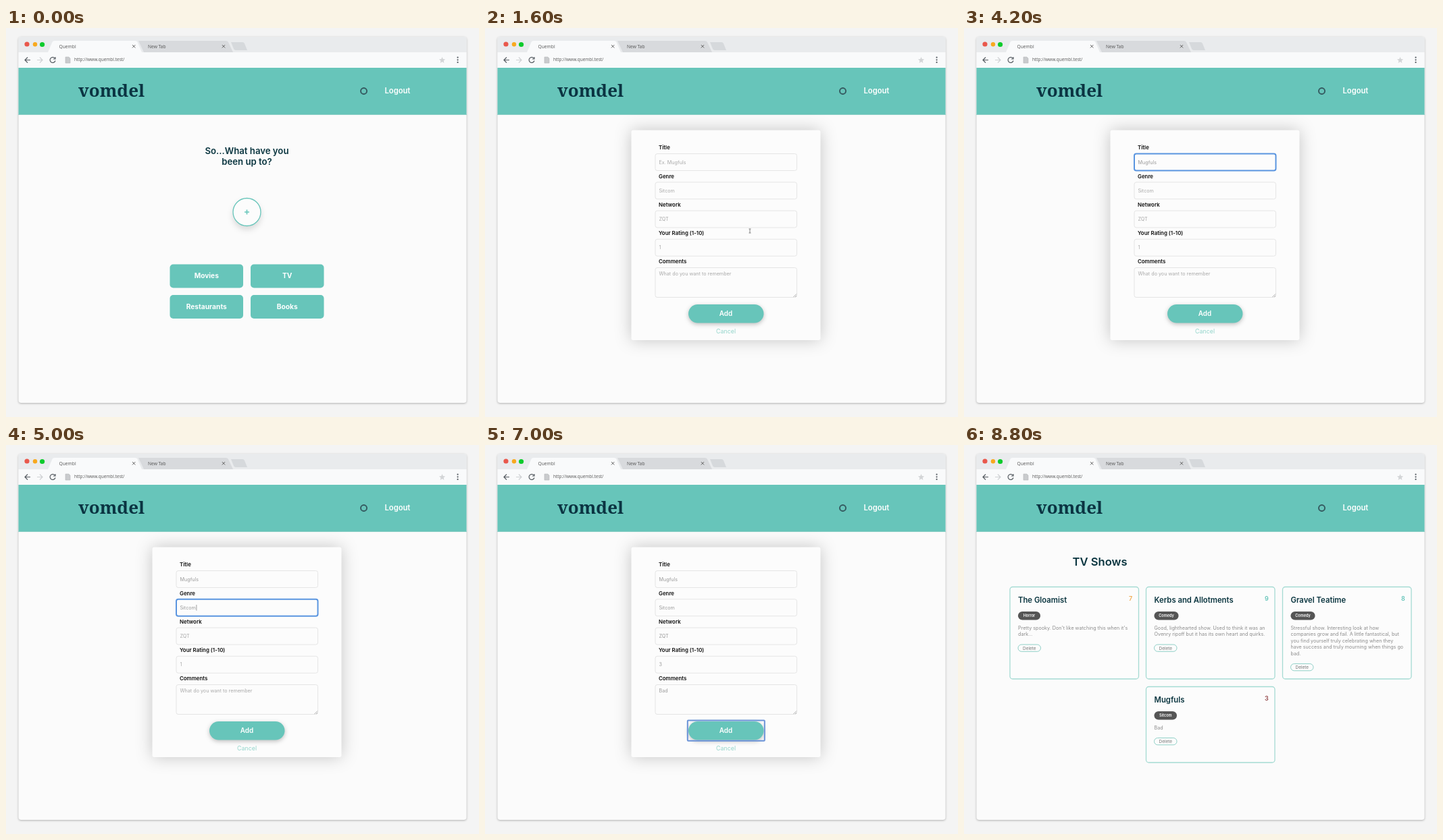
Write an HTML page that moves like this. It is 700 px wide and 577 px high and loops after 9000 ms.

```html
<!DOCTYPE html>
<html lang="en">
<head>
<meta charset="utf-8">
<title>Watch list</title>
<style>
  html, body { margin: 0; width: 100%; height: 100%; overflow: hidden; background: #f4f4f4; }
  svg { display: block; font-family: Inter, sans-serif; }
  .chrome { font-family: "Open Sans", "Noto Sans", sans-serif; }
  .logo { font-family: "Noto Serif", serif; }
  .modal { filter: drop-shadow(0 0 12px rgba(0, 0, 0, .22)); }
  .raised { filter: drop-shadow(0 2px 3px rgba(0, 0, 0, .25)); }
  .floating { filter: drop-shadow(0 5px 4px rgba(0, 0, 0, .13)); }
  .window { filter: drop-shadow(0 1px 1.5px rgba(0, 0, 0, .28)); }
</style>
</head>
<body>
<svg width="700" height="577" viewBox="0 0 700 577">
  <rect class="window" x="18.5" y="13" width="663" height="543" rx="4" fill="#fbfbfb"/>
  <g class="chrome" fill="none" stroke-width="1.2">
    <path d="M18.5 36V17q0-4 4-4h655q4 0 4 4v19z" fill="#e9ebed"/>
    <path d="M18.5 36h663v23h-663z" fill="#f9fafb"/>
    <path d="M196 19H325q3 0 4 2l7 15H204z" fill="#d8dadd"/>
    <path d="M62 36l6-14q1-3 4-3H191q3 0 4 3l6 14z" fill="#f9fafb"/>
    <path d="M333 21h17q2 0 3 2l4 10h-17q-2 0-3-2z" fill="#d6d9dc"/>
    <circle cx="31" cy="24" r="3.6" fill="#e9584c"/>
    <circle cx="43" cy="24.3" r="3.2" fill="#f8a91f"/>
    <circle cx="53.6" cy="24.5" r="3.6" fill="#0ccb2c"/>
    <path d="M187 25l4.4 4.4m0-4.4l-4.4 4.4M319.800 25l4.400 4.400m0-4.400l-4.400 4.400" stroke="#666" stroke-width="1"/>
    <path d="M36 47.500h-8m4-4l-4 4l4 4" stroke="#555b61"/>
    <path d="M46 47.500h8m-4-4l4 4l-4 4" stroke="#cfd1d3"/>
    <path d="M72.300 45A4 4 0 1 0 73 48.500M73 43v3h-3" stroke="#555b61"/>
    <path d="M88 43h5l2 2v7h-7z" fill="#c9cbcd" stroke="#b5b7b9" stroke-width=".6"/>
    <path d="M645.500 43l1.300 3.100 3.300.3-2.500 2.200.8 3.300-2.900-1.800-2.900 1.800.8-3.300-2.500-2.200 3.300-.3z" fill="#d3d5d7"/>
    <path d="M668.500 43.700h.01m-.01 3.600h.01m-.01 3.600h.01" stroke="#555b61" stroke-width="2.200" stroke-linecap="round"/>
    <g fill="#555" font-size="6.700">
      <text x="78.500" y="30">Quembl</text>
      <text x="210" y="30.200">New Tab</text>
      <text x="101" y="49.400" font-size="6.500">http://www.quembl.test/</text>
    </g>
  </g>
  <path d="M18.500 59h663v70h-663z" fill="#67c5ba"/>
  <path d="M18.500 128.500h663" stroke="#8fcfc7"/>
  <text class="logo" x="107" y="102" font-size="26" font-weight="900" fill="#0b3442">vomdel</text>
  <circle cx="529.500" cy="93.500" r="4.500" fill="none" stroke="#34595f" stroke-width="1.900"/>
  <text x="560.500" y="97" font-size="11.200" font-weight="600" fill="#fff">Logout</text>
  <g id="page"></g>
</svg>
<script>
const LOOP = 9000, TICK = 200;
const TEAL = '#67c5ba', PALE = '#a5dbd3', INK = '#0b3640', PAPER = '#fcfcfc';
const MID = 356.5;
const CATEGORIES = ['Movies', 'TV', 'Restaurants', 'Books'];
const page = document.getElementById('page');

const text = (x, y, str, size, fill, weight = 400, anchor = 'start') =>
  `<text x="${x}" y="${y}" font-size="${size}" fill="${fill}" font-weight="${weight}" text-anchor="${anchor}">${str}</text>`;
const box = (x, y, w, h, r, fill, stroke = 'none', line = 1, cls = '') =>
  `<rect class="${cls}" x="${x}" y="${y}" width="${w}" height="${h}" rx="${r}" fill="${fill}" stroke="${stroke}" stroke-width="${line}"/>`;
const path = (d, stroke, line = 1, fill = 'none') =>
  `<path d="${d}" stroke="${stroke}" stroke-width="${line}" fill="${fill}"/>`;
const cancel = y => text(MID, y, 'Cancel', 8.9, '#93d5cb', 400, 'middle');
const smooth = p => { p = Math.min(1, Math.max(0, p)); return p * p * (3 - 2 * p); };

// Four category buttons in two columns.
const grid = (x, y, w, h, stepX, stepY, draw) =>
  CATEGORIES.map((name, i) => draw(name, x + i % 2 * stepX, y + (i >> 1) * stepY, w, h)).join('');

function home(t) {
  const grow = 10 * smooth((t - 200) / 400);
  return text(MID, 187 - grow, 'So...What have you', 13.2, INK, 600, 'middle')
    + text(MID, 202.5 - grow, 'been up to?', 13.2, INK, 600, 'middle')
    + `<circle class="floating" cx="${MID}" cy="273" r="${20.5 + grow}" fill="${PAPER}" stroke="${TEAL}" stroke-width="1.3"/>`
    + path('M353 273h7m-3.500-3.500v7', TEAL, 1.6)
    + grid(242.5, 350.5 + grow, 108.5, 35, 119.5, 45.5, (name, x, y, w, h) =>
        box(x, y, w, h, 5, TEAL) + text(x + w / 2, y + 20.7, name, 10.2, '#fff', 700, 'middle'));
}

function picker() {
  return box(230.5, 218.5, 252, 174, 3, PAPER, 'none', 0, 'modal')
    + text(MID, 267.5, 'Select your category', 7.2, '#9b9b9b', 400, 'middle')
    + grid(276.5, 289, 75.5, 24.3, 83.5, 32.3, (name, x, y, w, h) =>
        box(x, y, w, h, 5, PAPER, PALE, 1.2) + text(x + w / 2, y + 15, name, 8.5, INK, 600, 'middle'))
    + cancel(375);
}

const FIELDS = [
  { label: 'Title', hint: 'Ex. Mugfuls', value: 'Mugfuls', focus: 2400, type: 2800 },
  { label: 'Genre', hint: 'Sitcom', value: 'Sitcom', focus: 4400, type: 4400 },
  { label: 'Network', hint: 'ZQT', value: 'ZQT', focus: 5200, type: 5200 },
  { label: 'Your Rating (1-10)', hint: '1', value: '3', focus: 5800, type: 5800 },
  { label: 'Comments', hint: 'What do you want to remember', value: 'Bad', focus: 6200, type: 6200 },
];
const ADD_FOCUS = 6800, KEY = 100;

function field({ label, hint, value, focus, type }, i, t) {
  const y = 186.5 + i * 42.25, h = i === 4 ? 44 : 25;
  const blur = i < 4 ? FIELDS[i + 1].focus : ADD_FOCUS;
  const active = t >= focus && t < blur;
  const typed = value.slice(0, Math.max(0, Math.floor((t - type) / KEY)));
  const end = type + value.length * KEY;
  const since = t < type ? t - focus : Math.max(0, t - end);
  const caret = active && since % 1000 < 500 ? '<tspan fill="#555">|</tspan>' : '';
  const baseline = y + (i === 4 ? 11.5 : 15.2);
  return text(257, y - 6.2, label, 7.9, '#111', 600)
    + box(252, y, 209.5, h, 3, PAPER, active ? '#5a95e0' : '#e5e5e5', active ? 2 : 1)
    + (typed ? '' : text(257.5, baseline, hint, 7.2, '#a9a9a9'))
    + text(257.5, baseline, typed + caret, 7.2, '#9a9a9a')
    + (active && i === 3 ? path('M454.500 324.500l2-2 2 2zm0 3l2 2 2-2z', 'none', 0, '#777') : '');
}

function form(t) {
  const focused = t >= ADD_FOCUS;
  return box(216.5, 151.5, 280, 311.5, 3, PAPER, 'none', 0, 'modal')
    + FIELDS.map((f, i) => field(f, i, t)).join('')
    + path('M456.500 399l4.500-4.500m-2 4.500l2-2', '#999', .8)
    + box(301, 410, 111.5, 27.5, 13.75, TEAL, 'none', 0, 'raised')
    + (focused ? box(299.8, 408.5, 114, 30.3, 1, 'none', '#6a93d8', 2) : '')
    + text(MID, 427.4, 'Add', 9.9, '#fff', 600, 'middle')
    + cancel(452.5);
}

const SHOWS = [
  { x: 68, y: 210.5, h: 136.5, title: 'The Gloamist', genre: 'Horror', pill: 33, score: 7, color: '#f0a94e',
    lines: ["Pretty spooky. Don't like watching this when it's", 'dark...'] },
  { x: 269.5, y: 210.5, h: 136.5, title: 'Kerbs and Allotments', genre: 'Comedy', pill: 36, score: 9, color: TEAL,
    lines: ['Good, lighthearted show. Used to think it was an', 'Ovenry ripoff but it has its own heart and quirks.'] },
  { x: 471.5, y: 210.5, h: 136.5, title: 'Gravel Teatime', genre: 'Comedy', pill: 36, score: 8, color: TEAL,
    lines: ['Stressful show. Interesting look at how', 'companies grow and fail. A little fantastical, but',
      'you find yourself truly celebrating when they', 'have success and truly mourning when things go', 'bad.'] },
  { x: 269.5, y: 358.5, h: 112.5, title: 'Mugfuls', genre: 'Sitcom', pill: 33.5, score: 3, color: '#94494b', lines: ['Bad'] },
];

function card({ x, y, h, title, genre, pill, score, color, lines }) {
  const left = x + 12, foot = y + 66.5 + lines.length * 9.5;
  return box(x, y, 190.5, h, 4, PAPER, PALE, 1.3)
    + text(left, y + 23.7, title, 11.3, INK, 600)
    + text(x + 181.3, y + 20, score, 9, color, 600, 'end')
    + box(left, y + 36.5, pill, 12.5, 6.25, '#555')
    + text(left + pill / 2, y + 44.8, genre, 5.6, '#fff', 600, 'middle')
    + lines.map((line, i) => text(left, y + 63.4 + i * 9.5, line, 7.2, '#8c8c8c')).join('')
    + box(left, foot, 33.5, 10.3, 5.15, PAPER, '#8fd0c7')
    + text(left + 16.75, foot + 7.5, 'Delete', 6.4, '#777', 400, 'middle');
}

const list = () => text(160.5, 179, 'TV Shows', 16.6, INK, 600) + SHOWS.map(card).join('');

// Pointer stops: time, x, y
const STOPS = [[200, 385, 330], [400, 360, 280], [600, 360, 280], [800, 366, 285],
  [1200, 392, 301], [1600, 392, 301], [2400, 328, 208], [2800, 328, 208]];

function pointer(t) {
  const i = STOPS.findIndex(([end], k) => k && t >= STOPS[k - 1][0] && t < end);
  if (i < 0) return '';
  const [t0, x0, y0] = STOPS[i - 1], [t1, x1, y1] = STOPS[i];
  const p = smooth((t - t0) / (t1 - t0));
  const shape = t < 1600
    ? path('M-1 0q1-1 2 0v3l4 1q1 0 1 2l-1 3H0l-3-4q0-1.500 2 0z', '#555', .8, '#fff')
    : path('M-1.500-3h3m-1.500 0v6m-1.500 0h3', '#777', .9);
  return `<g transform="translate(${x0 + (x1 - x0) * p} ${y0 + (y1 - y0) * p})">${shape}</g>`;
}

function scene(t) {
  if (t >= 7200) return list();
  if (t >= 1600) return form(t) + pointer(t);
  return home(t) + (t >= 600 ? picker() : '') + pointer(t);
}

let shown = -1;
function frame() {
  const t = Math.floor(performance.now() % LOOP / TICK) * TICK;
  if (t !== shown) page.innerHTML = scene(shown = t);
  requestAnimationFrame(frame);
}
frame();
</script>
</body>
</html>
```
